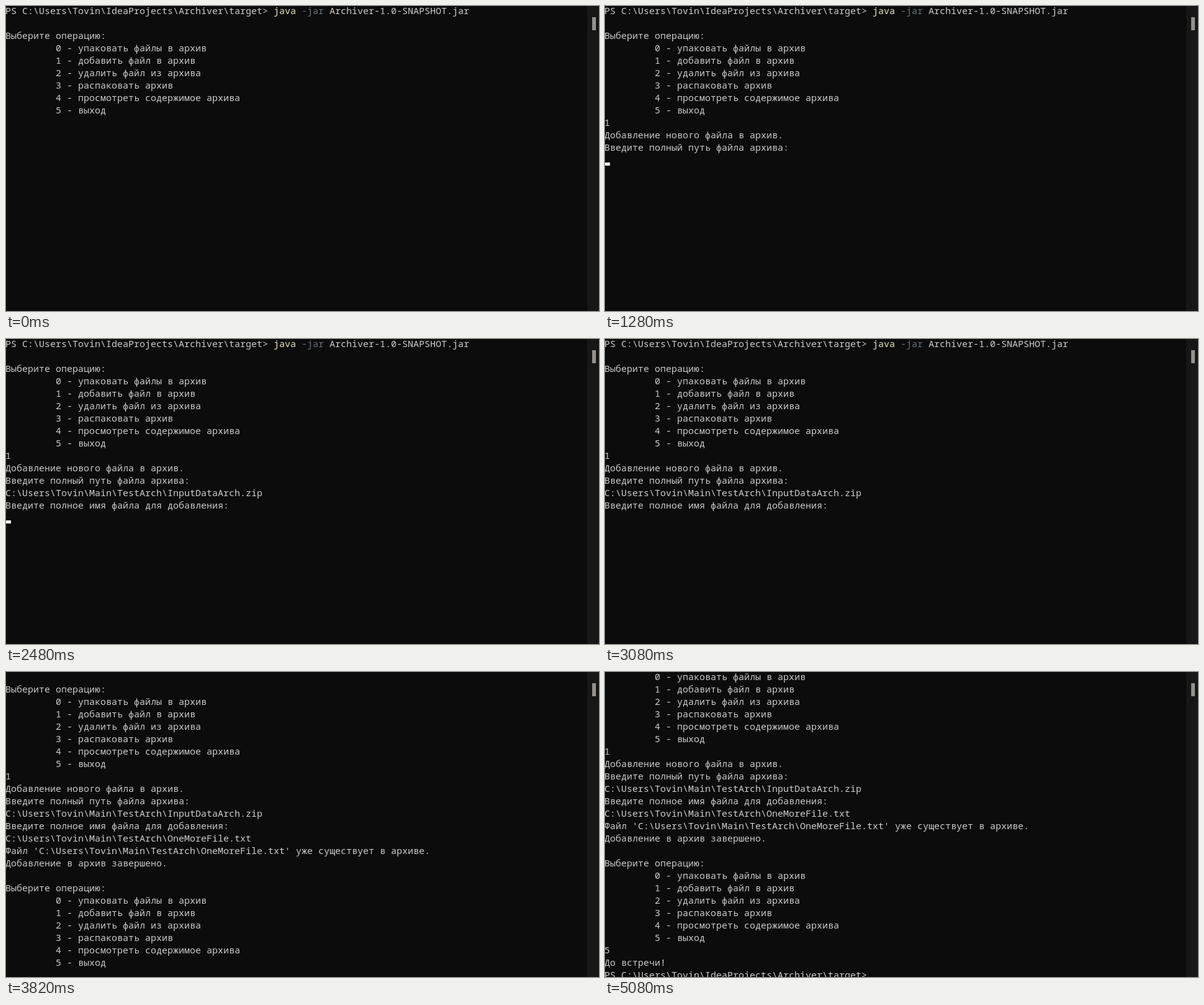
An HTML page that plays this animation: 955 by 491 pixels, repeating every 5.75 s.

```html
<!DOCTYPE html>
<html lang="ru">
<head>
<meta charset="utf-8">
<title>Archiver</title>
<style>
  html, body { margin: 0; width: 100%; height: 100%; overflow: hidden; background: #0c0c0c; }
  .stage { position: relative; width: 955px; height: 491px; overflow: hidden; background: #0c0c0c; }

  .screen, .log, .cursor { animation: 5750ms step-end infinite; }

  /* the whole view scrolls by 20px rows */
  .screen { position: absolute; left: -1px; top: -3px; width: 936px; animation-name: scroll; }

  /* output appears row by row: the log grows in height */
  .log {
    margin: 0; height: 180px; overflow: hidden;
    font: 15px/20px "Noto Sans Mono", "DejaVu Sans Mono", monospace;
    font-variant-ligatures: none;
    color: #ccc; white-space: pre;
    animation-name: reveal;
  }
  .cmd { color: #e9e4bd; }
  .opt { color: #66727a; }

  .cursor {
    position: absolute; left: 0; top: 15px; width: 9px; height: 5px;
    background: #f2f2f2; visibility: hidden;
    animation-name: blink;
  }

  .bar { position: absolute; left: 936px; top: 0; width: 19px; height: 491px; background: #171717; }
  .bar::after {
    content: ""; position: absolute; left: 8px; top: 18px;
    width: 6px; height: 21px; background: #94918b;
  }

  @keyframes scroll {
    0% { transform: none; }
    66.4348% { transform: translateY(-20px); }
    88.3478%, 100% { transform: translateY(-60px); }
  }

  @keyframes reveal {
    0% { height: 180px; }
    10.6087% { height: 200px; }
    22.2609% { height: 240px; }
    32.6957% { height: 260px; }
    43.1304% { height: 280px; }
    54.7826% { height: 300px; }
    66.4348% { height: 500px; }
    76.6957% { height: 520px; }
    88.3478%, 100% { height: 560px; }
  }

  @keyframes blink {
    0% { visibility: hidden; transform: none; }
    10.6087% { visibility: visible; transform: translate(9px, 180px); }
    18.7826% { visibility: hidden; transform: translate(9px, 180px); }
    22.2609% { visibility: visible; transform: translate(0, 240px); }
    32.6957% { visibility: visible; transform: translate(414px, 240px); }
    39.8261% { visibility: hidden; transform: translate(414px, 240px); }
    43.1304% { visibility: visible; transform: translate(0, 280px); }
    53.5652% { visibility: hidden; transform: translate(0, 280px); }
    54.7826% { visibility: visible; transform: translate(396px, 280px); }
    62.9565%, 100% { visibility: hidden; transform: translate(396px, 280px); }
  }
</style>
</head>
<body>
<div class="stage">
  <div class="screen">
<pre class="log">PS C:\Users\Tovin\IdeaProjects\Archiver\target&gt; <span class="cmd">java</span> <span class="opt">-jar</span> Archiver-1.0-SNAPSHOT.jar

Выберите операцию:
         0 - упаковать файлы в архив
         1 - добавить файл в архив
         2 - удалить файл из архива
         3 - распаковать архив
         4 - просмотреть содержимое архива
         5 - выход
1
Добавление нового файла в архив.
Введите полный путь файла архива:
C:\Users\Tovin\Main\TestArch\InputDataArch.zip
Введите полное имя файла для добавления:
C:\Users\Tovin\Main\TestArch\OneMoreFile.txt
Файл 'C:\Users\Tovin\Main\TestArch\OneMoreFile.txt' уже существует в архиве.
Добавление в архив завершено.

Выберите операцию:
         0 - упаковать файлы в архив
         1 - добавить файл в архив
         2 - удалить файл из архива
         3 - распаковать архив
         4 - просмотреть содержимое архива
         5 - выход
5
До встречи!
PS C:\Users\Tovin\IdeaProjects\Archiver\target&gt;</pre>
    <div class="cursor"></div>
  </div>
  <div class="bar"></div>
</div>
</body>
</html>
```
